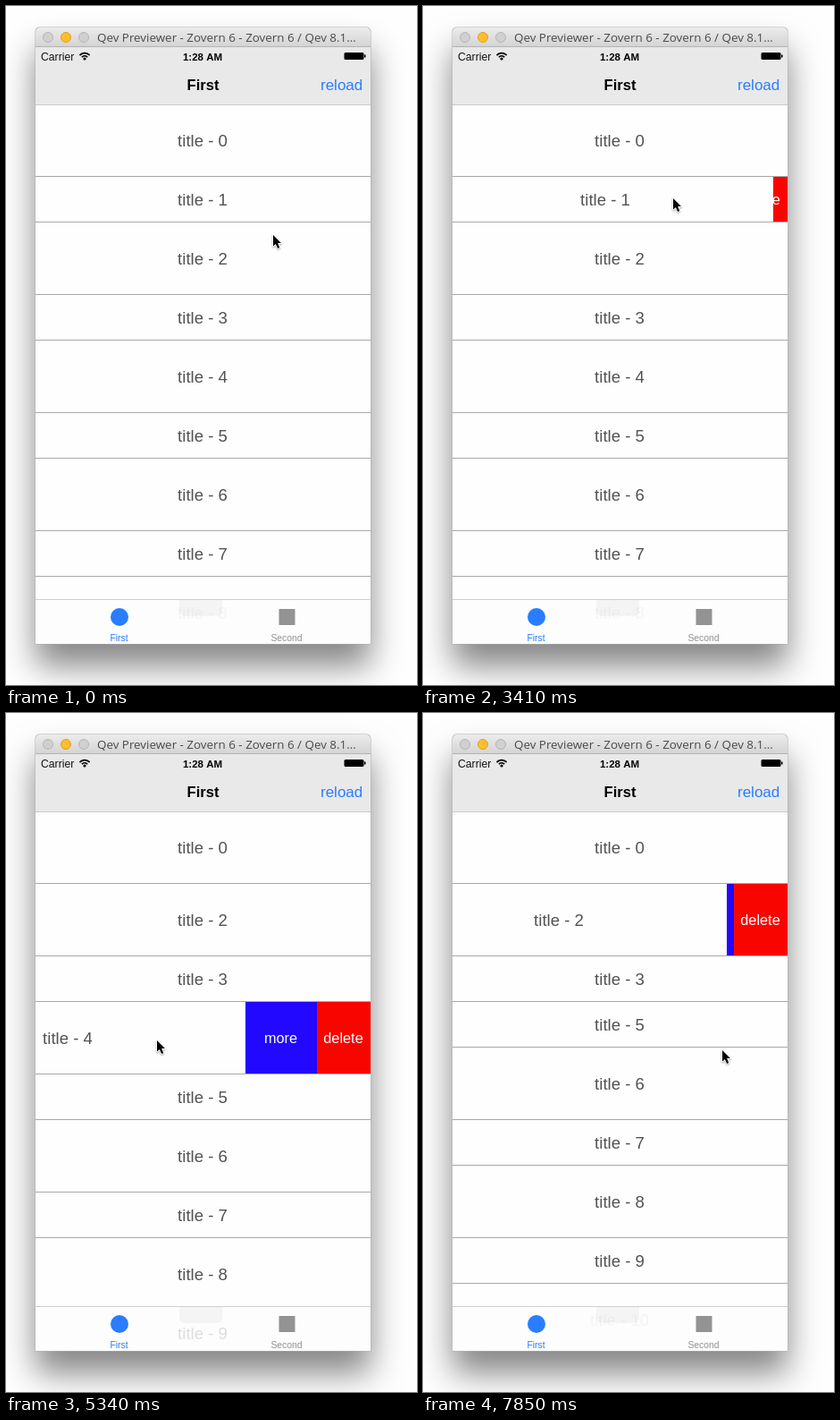
An HTML page with a canvas for the animation above (8000 ms loop, 460 by 759 pixels).

```html
<!DOCTYPE html>
<html lang="en">
<head>
<meta charset="utf-8">
<title>Swipe list</title>
<style>
html, body { margin: 0; width: 460px; height: 759px; overflow: hidden; background: #fefefe; }
canvas { display: block; width: 460px; height: 759px; }
</style>
</head>
<body>
<canvas id="stage" width="460" height="759"></canvas>
<script>
const ctx = document.getElementById('stage').getContext('2d');
const LOOP = 8000, STEPS = 54;
const L = 33, R = 408, W = R - L, TOP = 110, TAB = 663, END = 713;
const SANS = '"Liberation Sans", Arial, sans-serif';
const TITLE_FONT = '18.6px ' + SANS;
const BLUE = '#2a7dff', WHITE = '#fefefe', LINE = '#a9a9a9';
const BOTH = 140, DELETE = 60;

// All times below are in steps of the loop.
const ramp = (s, from, span) => {
  const k = Math.min(1, Math.max(0, (s - from) / span));
  return k * k * (3 - 2 * k);
};
const pulse = (s, open, openFor, shut, shutFor) =>
  ramp(s, open, openFor) * (1 - ramp(s, shut, shutFor));

const removedAt = { 1: 27.66, 4: 42 };
const removal = (id, s) => id in removedAt ? ramp(s, removedAt[id], 1.742) : 0;

const offsets = {
  1: s => -DELETE * pulse(s, 22, 3, removedAt[1], 0.61),
  2: s => 12 * pulse(s, 4, 4, 9, 2)
    - BOTH * (pulse(s, 11, 3, 19, 2) + pulse(s, 47, 2, 52, 1.96)),
  4: s => -BOTH * pulse(s, 35, 1, removedAt[4], 0.61) - 11 * pulse(s, 35, 1, 36, 1)
};

// Each move starts, lasts, and ends at a point; the pointer rests in between.
const moves = [
  { from: 0, span: 4, x: 124, y: 320 },
  { from: 4, span: 4, x: 357, y: 303 },
  { from: 10, span: 5, x: 170, y: 298 },
  { from: 15, span: 3, x: 305, y: 290 },
  { from: 19, span: 3, x: 335, y: 216 },
  { from: 22, span: 2, x: 262, y: 214 },
  { from: 24, span: 2, x: 388, y: 220 },
  { from: 29, span: 5, x: 352, y: 366 },
  { from: 35, span: 1, x: 169, y: 366 },
  { from: 36, span: 3, x: 392, y: 362 },
  { from: 44, span: 3, x: 350, y: 230 },
  { from: 47, span: 2, x: 225, y: 231 },
  { from: 49, span: 3, x: 338, y: 411 },
  { from: 52, span: 1, x: 335, y: 377 }
];

function pointer(s) {
  let x = 299, y = 256;
  for (const m of moves) {
    if (s <= m.from) break;
    const rest = 1 - Math.min(1, (s - m.from) / m.span);
    const k = 1 - rest * rest;
    x += (m.x - x) * k;
    y += (m.y - y) * k;
  }
  return [Math.round(x), Math.round(y)];
}

function box(x, y, w, h, color) {
  ctx.fillStyle = color;
  ctx.fillRect(x, y, w, h);
}

function round(x, y, w, h, r, color) {
  ctx.fillStyle = color;
  ctx.beginPath();
  ctx.roundRect(x, y, w, h, r);
  ctx.fill();
}

function disc(x, y, r, color, edge) {
  ctx.beginPath();
  ctx.arc(x, y, r, 0, Math.PI * 2);
  ctx.fillStyle = color;
  ctx.fill();
  if (edge) {
    ctx.strokeStyle = edge;
    ctx.lineWidth = 1;
    ctx.stroke();
  }
}

function text(str, x, y, font, color, align = 'left') {
  ctx.font = font;
  ctx.fillStyle = color;
  ctx.textAlign = align;
  ctx.fillText(str, x, y);
}

function clip(x, y, w, h, draw) {
  ctx.save();
  ctx.beginPath();
  ctx.rect(x, y, w, h);
  ctx.clip();
  draw();
  ctx.restore();
}

function windowFrame() {
  box(0, 0, 460, 759, WHITE);
  ctx.save();
  ctx.shadowColor = 'rgba(0,0,0,.475)';
  ctx.shadowBlur = 36;
  ctx.shadowOffsetY = 25;
  round(L, 24, W, END - 24, 5, WHITE);
  ctx.restore();
  round(L - 0.5, 23.5, W + 1, END - 23, [5, 5, 0, 0], '#b0b0b0');
  box(L, TOP, W, END - TOP, WHITE);
}

function titleBar() {
  const shade = ctx.createLinearGradient(0, 24, 0, 46);
  shade.addColorStop(0, '#ececec');
  shade.addColorStop(1, '#d3d3d3');
  round(L, 24, W, 22, [5, 5, 0, 0], shade);
  box(L, 45, W, 1, '#b4b4b4');
  ['#d0d0d0', '#fdbd2f', '#d0d0d0'].forEach((color, i) =>
    disc(47 + 20 * i, 35, 5.5, color, i === 1 ? '#dfa023' : '#b5b5b5'));
  text('Qev Previewer - Zovern 6 - Zovern 6 / Qev 8.1…', 102, 40,
    '13.4px "Open Sans", "Noto Sans", sans-serif', '#4a4a4a');
}

function navBar() {
  box(L, 46, W, 64, '#e9e9e9');
  box(L, TOP, W, 1, '#cacaca');
  text('Carrier', 39, 61, '12.2px ' + SANS, '#111');
  ctx.strokeStyle = '#000';
  ctx.lineWidth = 1.6;
  for (const r of [4.2, 7.4]) {
    ctx.beginPath();
    ctx.arc(88, 60, r, -Math.PI * 0.77, -Math.PI * 0.23);
    ctx.stroke();
  }
  disc(88, 59, 1.6, '#000');
  text('1:28 AM', 220, 60.5, 'bold 11.5px ' + SANS, '#000', 'center');
  round(378.5, 52, 22, 8, 1.5, '#000');
  box(401, 54.5, 1.5, 3, '#000');
  text('First', 220.5, 94, 'bold 16.5px ' + SANS, '#000', 'center');
  text('reload', 352, 94, '17px ' + SANS, BLUE);
}

function button(label, x, w, r, color) {
  box(x, r.y, w, r.h - 1, color);
  text(label, x + w / 2 - 0.5, r.y + r.h / 2 + 5, '16.3px ' + SANS, '#fff', 'center');
}

function buttons(r) {
  const shown = Math.min(BOTH, -r.dx);
  if (shown <= 0) return;
  clip(R - shown, r.y, shown, r.h - 1, () => {
    if (r.id % 2 === 0) button('more', R - BOTH, BOTH - DELETE, r, '#2208ff');
    button('delete', R - DELETE, DELETE, r, r.gone ? '#f01505' : '#f90500');
  });
}

function rowTitle(r, alpha) {
  ctx.globalAlpha = alpha;
  text('title - ' + r.id, 220 + r.dx, r.y + (r.h - 1) / 2 + 6.5, TITLE_FONT, '#525252', 'center');
  ctx.globalAlpha = 1;
}

function layout(s) {
  const rows = [];
  let y = TOP;
  for (let id = 0; y < 760; id++) {
    const h = id % 2 ? 51 : 81;
    const gone = removal(id, s);
    const dx = offsets[id] ? Math.round(offsets[id](s)) : 0;
    if (gone < 1) rows.push({ id, y, h, gone, dx });
    y += Math.round(2 * h * (1 - gone)) / 2;
  }
  return rows;
}

function list(rows) {
  clip(L, TOP, W, TAB - TOP, () => {
    let cover = 0;
    for (const r of rows) {
      const grey = 254 - 87 * r.gone;
      box(L, r.y, W, r.h, `rgb(${grey},${grey},${grey})`);
      if (!r.gone) {
        rowTitle(r, 1 - cover * 0.6);
        buttons(r);
        box(L, r.y + r.h - 1, W, 1, LINE);
      }
      cover = r.gone;
    }
    for (const r of rows.filter(r => r.gone)) {
      rowTitle(r, 1 - r.gone);
      buttons(r);
    }
  });
}

function tabBar(rows) {
  box(L, TAB, W, END - TAB, '#fdfdfd');
  box(L, TAB, W, 1, '#cfcfcf');
  // Titles show faintly through the bar, clearer near its lower edge.
  clip(L, TAB + 1, W, END - TAB - 1, () => {
    round(194, TAB + 1, 48, 18, [0, 0, 6, 6], '#f4f4f4');
    for (const r of rows) {
      const depth = r.y + r.h / 2 - 673;
      if (depth > 0) rowTitle(r, Math.min(0.3, depth * 0.009));
    }
  });
  disc(127, 683, 10, BLUE);
  box(305.5, 674, 18, 18, '#939393');
  text('First', 126.5, 709.5, '10.4px ' + SANS, BLUE, 'center');
  text('Second', 314, 709.5, '10.4px ' + SANS, '#929292', 'center');
}

function cursor(x, y) {
  ctx.save();
  ctx.translate(x, y);
  ctx.scale(0.93, 0.93);
  const arrow = new Path2D('M0 0V13.5L3.1 10.7 5.5 16 7.8 15 5.5 9.8H9.6Z');
  ctx.shadowColor = 'rgba(0,0,0,.35)';
  ctx.shadowBlur = 2;
  ctx.shadowOffsetY = 1;
  ctx.strokeStyle = '#fff';
  ctx.lineWidth = 2;
  ctx.lineJoin = 'round';
  ctx.stroke(arrow);
  ctx.shadowColor = 'transparent';
  ctx.fillStyle = '#000';
  ctx.fill(arrow);
  ctx.restore();
}

function draw(s) {
  const rows = layout(s);
  windowFrame();
  titleBar();
  list(rows);
  navBar();
  tabBar(rows);
  cursor(...pointer(s));
}

const start = performance.now();
let last = -1;
function tick() {
  const t = (performance.now() - start) % LOOP;
  const s = Math.min(STEPS - 1, Math.floor((t + 8) / LOOP * STEPS));
  if (s !== last) draw(last = s);
  requestAnimationFrame(tick);
}
tick();
</script>
</body>
</html>
```
